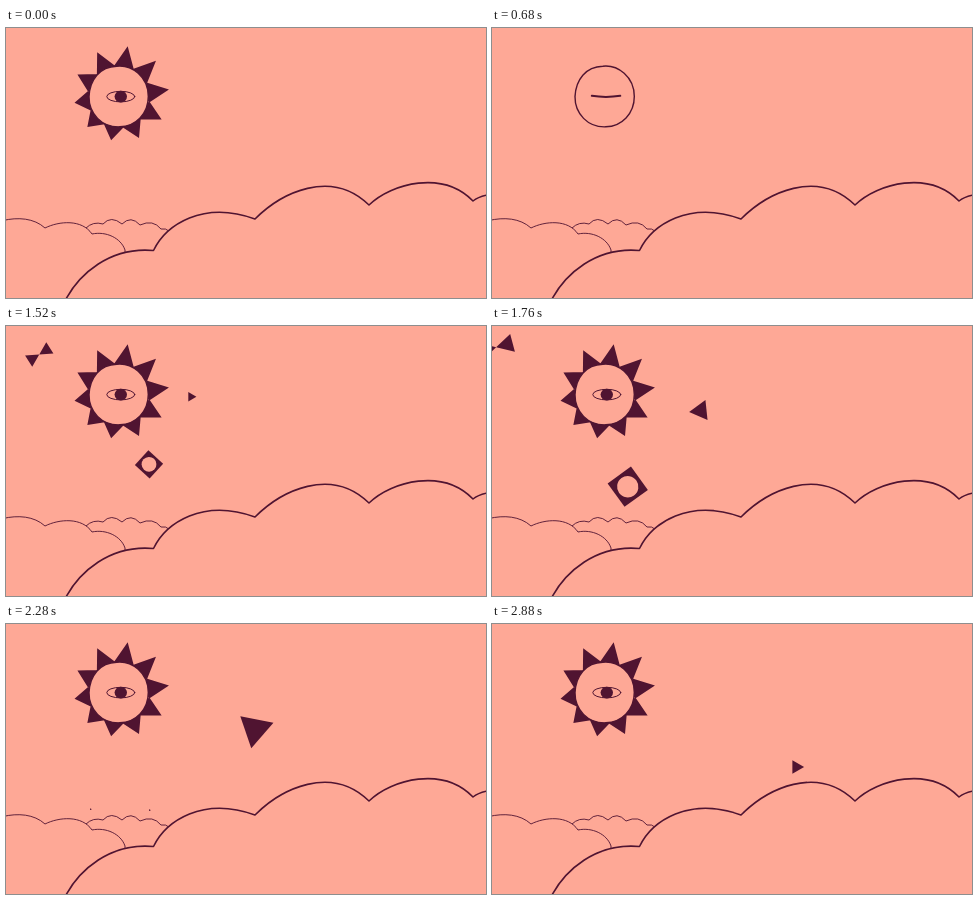
Animation, 480 px wide and 270 px high, one loop 2920 ms. Source, as an HTML page:

```html
<!DOCTYPE html>
<html lang="en">
<head>
<meta charset="utf-8">
<title>Sun and clouds</title>
<style>
  html, body { margin: 0; width: 100%; height: 100%; overflow: hidden; background: #fea896; }
  svg { display: block; width: 100%; height: 100%; --sky: #fea896; --ink: #501431; }
  .ink { fill: var(--ink); }
  .sky { fill: var(--sky); }
  .line { fill: var(--sky); stroke: var(--ink); stroke-linejoin: round; stroke-linecap: round; }
  .thin { stroke-width: .9; }
  .open { fill: none; }
</style>
</head>
<body>
<svg viewBox="0 0 480 270">
  <defs>
    <path id="puff" class="line thin" vector-effect="non-scaling-stroke" d="M-3 2 Q-6 -1 -2 -1 Q0 -4 2 -1 Q6 0 3 2 Q0 4 -3 2Z"/>
  </defs>
  <rect class="sky" width="480" height="270"/>
  <path id="bow" class="ink" d="M-.5 -.27 L0 0 L-.5 .27Z M.5 -.27 L0 0 L.5 .27Z"/>
  <g id="square">
    <rect class="ink" x="-.5" y="-.5" width="1" height="1"/>
    <circle class="sky" r=".37"/>
  </g>
  <path id="triangle" class="ink" d="M1 0 L-.5 .866 L-.5 -.866Z"/>

  <g transform="translate(112.8 68.6)">
    <path id="rays" class="ink"/>
    <path class="line" stroke-width="1.4" d="M-2 -30.4 C13 -32 29.5 -20 29.5 0 C29.5 17 17 30 1 30.2 C-17 31 -30 17 -29.8 0 C-29 -17 -19 -30 -2 -30.4Z"/>
    <g id="openEye">
      <ellipse class="line" cx="2" rx="14" ry="5.3"/>
      <ellipse class="ink" cx="2" rx="6.2" ry="5.8"/>
    </g>
    <path id="shutEye" class="line open" stroke-width="2" d="M-13 -.8 Q1 1.4 15.5 -.8"/>
  </g>

  <use id="puffL" href="#puff"/>
  <use id="puffR" href="#puff"/>

  <path class="sky" d="M80 200 Q87 193 97 196 Q105 187 116 196 Q125 187 134 197 Q147 191 155 201 L163 203 V270 H80Z"/>
  <path class="line thin open" d="M80 200 Q87 193 97 196 Q105 187 116 196 Q125 187 134 197 Q147 191 155 201 Q160 200 163 203"/>
  <path class="line thin" d="M-3 192.5 C12 189 28 190 39 200 C53 193 76 191 86 206 C100 203 115 210 119 222 V280 H-3Z"/>
  <path class="line" stroke-width="1.6" d="M60 271 C73 247 103 218.5 147.5 222.5 C160 197 197 172 249 191 C275 165 325 140 363 177 C386 155 437 142 467 173 Q473 168 484 166.5 V280 H60Z"/>
</svg>
<script>
const LOOP = 2920, STEP = 1000 / 12;
const RAYS = 10, BURST = 13;
const el = id => document.getElementById(id);
const ramp = (t, from, to) => Math.max(0, Math.min(1, (t - from) / (to - from)));
const quad = (start, speed, accel) => n => start + speed * n + accel * n * n;
const drift = (x, y, dx, dy) => [n => x + dx * n, n => y + dy * n, n => 1.9 - .27 * n, () => 0];

// Key points: steps after the burst, x, y, radius, angle.
const triangleKeys = [
  [-3, 142, 64, 1, 24],
  [5, 185, 70.7, 5.4, 120],
  [10, 224.5, 94, 15.8, 210],
  [14, 249, 105, 19.5, 221],
  [21, 304.3, 143, 7.8, 240]
];
const along = i => n => {
  const k = Math.max(1, triangleKeys.findIndex(key => key[0] >= n));
  const a = triangleKeys[k - 1], b = triangleKeys[k];
  return a[i] + (b[i] - a[i]) * ramp(n, a[0], b[0]);
};

// Each flight: first and last step after the burst, then x, y, size and angle.
const flights = {
  bow: [-3, 13, quad(67, -4.9, -.37), quad(31, .7, -.24), quad(10, 3, 0), quad(90, 15.3, -.74)],
  square: [-3, 12, quad(137.5, 3.3, -.44), quad(115.3, 2.8, .36), quad(10.5, 1.25, .13), quad(32, 1, .22)],
  triangle: [-3, 21, ...[1, 2, 3, 4].map(along)],
  puffL: [10, 16, ...drift(117, 211, -2.3, -1.85)],
  puffR: [10, 16, ...drift(127, 207, 1.2, -1.5)]
};

function polar(radius, degrees) {
  const a = degrees * Math.PI / 180;
  return `${(radius * Math.cos(a)).toFixed(2)} ${(radius * Math.sin(a)).toFixed(2)}`;
}

function drawSun(step) {
  const out = ramp(step, 10, 14), length = 1 - ramp(step, 3, 7) + out;
  const turn = step < 9 ? -25 * ramp(step, 3, 7) : -20 * (1 - out);
  const base = 27 + 4 * length;
  let path = '';
  for (let i = 0; i < RAYS; i++) {
    const angle = -80 + i * 360 / RAYS;
    const reach = 47.7 + 4 * Math.cos((angle + 50) * Math.PI / 180);
    const a = angle + turn, tip = 28 + (reach - 28) * length;
    path += `M${polar(base, a - 19)} L${polar(tip, a)} L${polar(base, a + 19)} L${polar(25, a)}Z`;
  }
  el('rays').setAttribute('d', path);

  const open = 1 - ramp(step, 4, 6) + ramp(step, 10, 12);
  el('openEye').setAttribute('transform', `scale(1 ${open})`);
  el('openEye').style.display = open ? '' : 'none';
  el('shutEye').style.display = open ? 'none' : '';
}

function drawFlight(id, n) {
  const [first, last, ...motion] = flights[id];
  const visible = n >= first && n <= last;
  el(id).style.display = visible ? '' : 'none';
  if (!visible) return;
  const [x, y, size, angle] = motion.map(f => f(n));
  el(id).setAttribute('transform', `translate(${x} ${y}) rotate(${angle}) scale(${Math.max(size, .1)})`);
}

const start = performance.now();
function draw() {
  const time = (performance.now() - start) % LOOP;
  const step = Math.min(34, Math.floor((time + 4) / STEP));
  drawSun(step);
  Object.keys(flights).forEach(id => drawFlight(id, step - BURST));
  requestAnimationFrame(draw);
}
draw();
</script>
</body>
</html>
```
